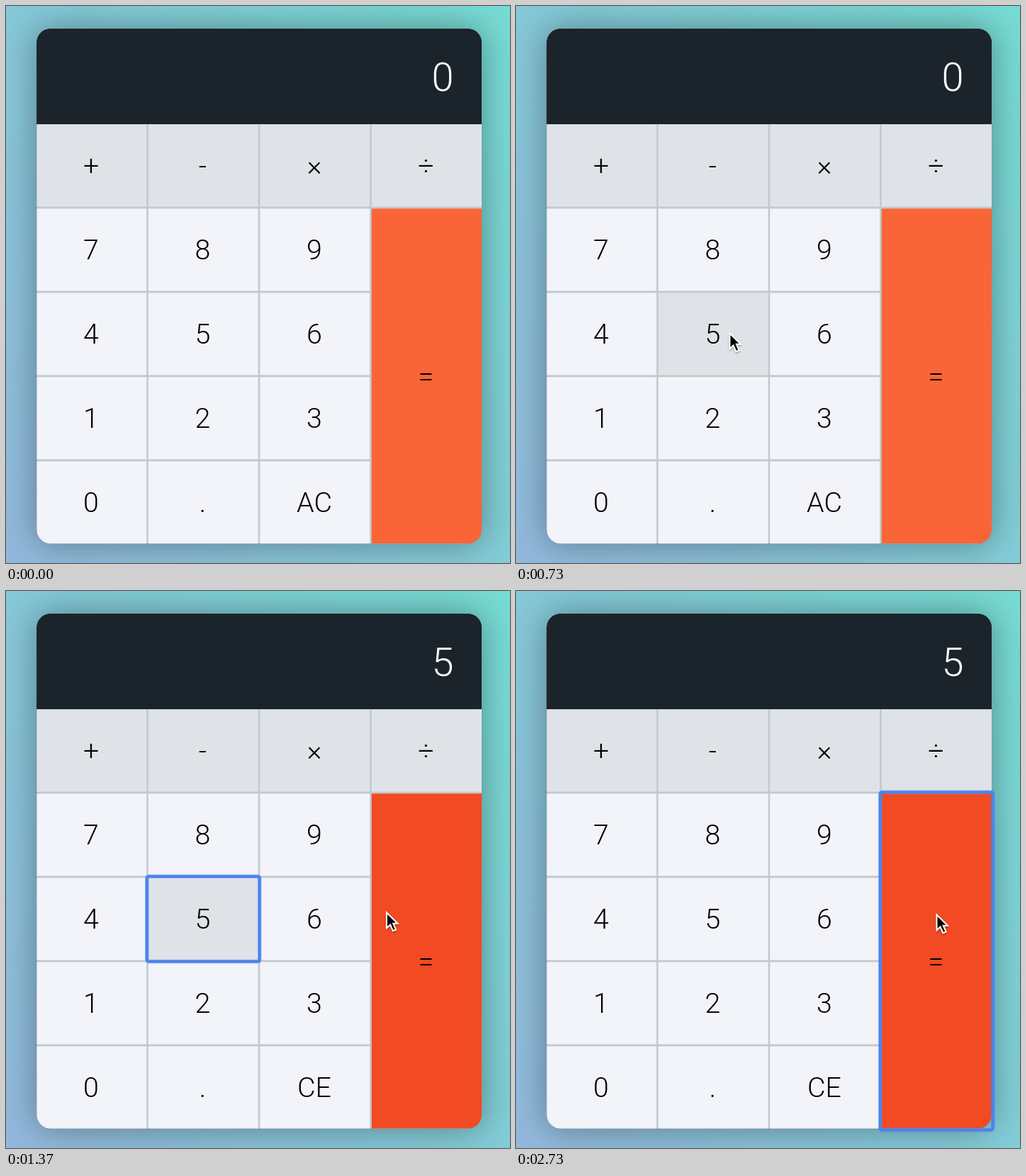
Write an HTML page that moves like this. It is 711 px wide and 787 px high and loops after 2760 ms.

```html
<!DOCTYPE html>
<html lang="en">
<head>
<meta charset="utf-8">
<title>Calculator</title>
<style>
  html, body { margin: 0; width: 100%; height: 100%; overflow: hidden; }
  body { background: linear-gradient(236deg, #76dcd3, #92b8dc); }
  svg { display: block; width: 711px; height: 787px; }
  text { font-family: Roboto, "Open Sans", sans-serif; font-weight: 300; }
  .label { font-size: 39.4px; text-anchor: middle; }
  .shadow { filter: drop-shadow(0 0 24px rgba(0, 0, 0, .36)); }
</style>
</head>
<body>
<svg id="stage" viewBox="0 0 711 787">
  <defs>
    <clipPath id="card"><rect x="43.3" y="32" width="627.7" height="727.7" rx="20"/></clipPath>
    <filter id="soft" x="-20%" y="-20%" width="140%" height="140%"><feGaussianBlur stdDeviation="0.7"/></filter>
    <filter id="drop" x="-50%" y="-50%" width="200%" height="200%">
      <feDropShadow dx="0" dy="1.5" stdDeviation="1.3" flood-opacity=".4"/>
    </filter>
  </defs>
  <rect class="shadow" x="43.3" y="32" width="627.7" height="727.7" rx="20" fill="#1c242b"/>
  <g clip-path="url(#card)">
    <rect x="43" y="32" width="629" height="135" fill="#1c242b"/>
    <rect x="43" y="167" width="629" height="594" fill="#c0cacd"/>
    <g id="keys"></g>
  </g>
  <text id="display" x="631.5" y="120" font-size="56" text-anchor="end" fill="#fff">0</text>
  <g id="ring" fill="none" stroke="#4a82ec">
    <rect rx="3" stroke-width="5.5" opacity=".6" filter="url(#soft)"/>
    <rect rx="2" stroke-width="3.6"/>
  </g>
  <path id="cursor" d="M1.5 2.5V24.2L6.6 19.4L10.4 28.2L14.5 26.4L10.8 17.8H17Z"
        fill="#000" stroke="#fff" stroke-width="2" filter="url(#drop)"/>
</svg>
<script>
const LOOP = 2760;
const DIGIT_FOCUS = 830, DIGIT_ENTERED = 900, EQUAL_FOCUS = 1850;
const COL = 157.5, ROW = 119, KEY_W = 154.9, KEY_H = 116.2;
const COLORS = {
  digit: ['#f2f4fa', '#dfe3e7'],
  operator: ['#dfe3e7', '#dfe3e7'],
  equal: ['#fa6537', '#f24a22']
};
// Pointer waypoints: time, x, y
const PATH = [
  [170, 722, 505], [330, 520, 464], [530, 357, 450], [700, 300, 460],
  [1130, 300, 460], [1370, 535, 452], [1560, 592, 455], [LOOP, 592, 455]
];

const $ = id => document.getElementById(id);

function add(parent, tag, attrs) {
  const el = document.createElementNS('http://www.w3.org/2000/svg', tag);
  setAll(el, attrs);
  return parent.appendChild(el);
}

function setAll(el, attrs) {
  for (const name in attrs) el.setAttribute(name, attrs[name]);
}

function makeKey(name, col, row, type, span = 1) {
  const x = 43.3 + col * COL, y = 167.3 + row * ROW;
  const height = KEY_H + (span - 1) * ROW;
  const box = add($('keys'), 'rect', { x, y, width: KEY_W + (col === 3 ? 1 : 0), height });
  const label = add($('keys'), 'text', { class: 'label', x: 120 + col * COL, y: y + height / 2 + 13.8 });
  label.textContent = name;
  return { name, x, y, width: KEY_W, height, type, box, label };
}

const keys = [];
['+-×÷', '789', '456', '123', '0.'].forEach((line, row) =>
  [...line].forEach((name, col) =>
    keys.push(makeKey(name, col, row, row ? 'digit' : 'operator'))));
const clear = makeKey('AC', 2, 4, 'digit');
const equal = makeKey('=', 3, 1, 'equal', 4);
keys.push(clear, equal);
const five = keys.find(key => key.name === '5');

// Monotone cubic through the waypoints, at rest wherever the direction turns
function along(axis, t) {
  const i = Math.max(0, PATH.findIndex(p => p[0] > t) - 1);
  const slope = k => (PATH[k + 1][axis] - PATH[k][axis]) / (PATH[k + 1][0] - PATH[k][0]);
  const tangent = k => {
    if (k === 0) return slope(0);
    if (k === PATH.length - 1) return 0;
    const a = slope(k - 1), b = slope(k);
    return a * b <= 0 ? 0 : 2 * a * b / (a + b);
  };
  const [p, q] = [PATH[i], PATH[i + 1]];
  const h = q[0] - p[0], u = (t - p[0]) / h, v = 1 - u;
  return v * v * (1 + 2 * u) * p[axis] + u * u * (3 - 2 * u) * q[axis]
    + h * u * v * (v * tangent(i) - u * tangent(i + 1));
}

function contains(key, x, y) {
  return x >= key.x && x <= key.x + key.width && y >= key.y && y <= key.y + key.height;
}

function render(t) {
  const shown = t >= PATH[0][0];
  const x = shown ? along(1, t) : 999, y = shown ? along(2, t) : 999;
  const focused = t >= EQUAL_FOCUS ? equal : t >= DIGIT_FOCUS ? five : null;
  const entered = t >= DIGIT_ENTERED;

  for (const key of keys) {
    const active = key === focused || contains(key, x + 2, y + 2);
    key.box.setAttribute('fill', COLORS[key.type][+active]);
  }
  $('display').textContent = entered ? '5' : '0';
  clear.label.textContent = entered ? 'CE' : 'AC';

  $('ring').style.display = focused ? '' : 'none';
  if (focused) {
    for (const rect of $('ring').children) {
      setAll(rect, {
        x: focused.x - 2, y: focused.y - 2,
        width: focused.width + 4, height: focused.height + 4
      });
    }
  }
  $('cursor').style.display = shown ? '' : 'none';
  $('cursor').setAttribute('transform', `translate(${x.toFixed(2)} ${y.toFixed(2)})`);
}

const start = performance.now();
function tick() {
  render((performance.now() - start) % LOOP);
  requestAnimationFrame(tick);
}
render(0);
requestAnimationFrame(tick);
</script>
</body>
</html>
```
